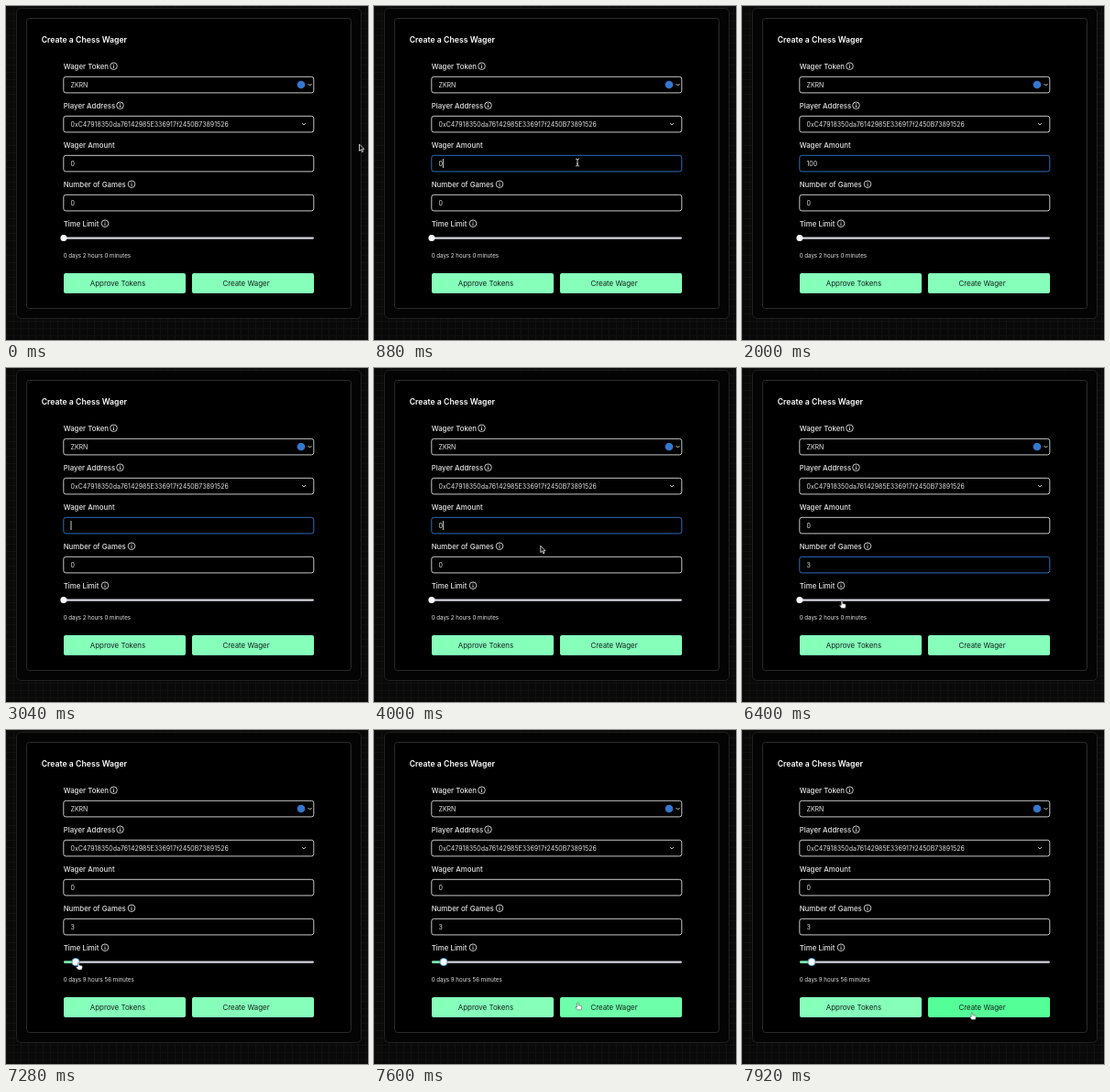
Animation of 395 by 365 pixels, one loop 8 s. Source, as an HTML page:

```html
<!DOCTYPE html>
<html lang="en">
<head>
<meta charset="utf-8">
<title>Wager form</title>
<style>
  html, body { margin: 0; width: 100%; height: 100%; overflow: hidden; background: #090909; }
  svg { display: block; }
  text { font: 7px Inter, "Liberation Sans", sans-serif; fill: #e4e4e4; white-space: pre; }
  .title { font-size: 8.7px; font-weight: 600; fill: #fff; }
  .label { font-size: 7.85px; font-weight: 500; }
  .note { font-size: 6.15px; }
  .button { font-size: 7.9px; fill: #10231a; text-anchor: middle; }
  .line { fill: none; stroke: #dedede; stroke-width: .9; }
</style>
</head>
<body>
<svg id="stage" width="395" height="365" viewBox="0 0 395 365">
  <defs>
    <pattern id="grid" width="8" height="8" patternUnits="userSpaceOnUse">
      <path d="M0 .5H8M.5 0V8" stroke="#111" />
    </pattern>
  </defs>
  <rect width="395" height="365" fill="#090909" />
  <rect width="395" height="365" fill="url(#grid)" />
  <rect x="11.5" y="2.5" width="376" height="339" rx="5" fill="#040404" stroke="#222" />
  <rect x="22.5" y="13.5" width="354" height="317" rx="3" fill="#000" stroke="#2b2b2b" />
  <text class="title" x="38.7" y="40">Create a Chess Wager</text>
  <g id="form"></g>

  <circle cx="322" cy="86" r="4.3" fill="#3478cf" />
  <path class="line" d="M329.5 85l2 2 2-2M323 128l2 2 2-2" />

  <rect x="63" y="252.5" width="273" height="2.2" rx="1.1" fill="#d3d6de" />
  <rect id="filled" x="63" y="252.5" height="2.2" rx="1.1" fill="#6df0a8" />
  <circle id="glow" cy="253.5" r="4.5" fill="#4a9bd0" />
  <circle id="thumb" cy="253.5" r="3.5" fill="#fff" />
  <text id="duration" class="note" x="62.7" y="274.6"></text>

  <rect x="63" y="292" width="133" height="22" rx="2" fill="#86ffbb" />
  <rect id="create" x="203" y="292" width="133" height="22" rx="2" />
  <text class="button" x="122" y="306">Approve Tokens</text>
  <text class="button" x="262" y="306">Create Wager</text>

  <path id="caret" stroke="#fff" stroke-width=".8" />
  <g id="pointer">
    <path id="arrow" d="M0 0V7.4L1.8 5.8 3 8.5 4.2 8 3 5.4H5.3Z" fill="#111" stroke="#eee" stroke-width=".8" />
    <path id="beam" d="M-2-4Q0-4 0-2.8Q0-4 2-4M0-3V3M-2 4Q0 4 0 2.8Q0 4 2 4M-1 1.2H1" fill="none" stroke="#ddd" stroke-width=".9" />
    <path id="hand" d="M-.8.6Q0-.5.8.6V3L3.6 3.6Q4.6 4 4.3 5.4L3.6 8H-.3L-2.6 5.2Q-2.6 4-.8 5Z" fill="#fff" stroke="#333" stroke-width=".5" />
  </g>
</svg>
<script>
const $ = id => document.getElementById(id);
const clamp = v => Math.min(1, Math.max(0, v));
const ease = v => (v = clamp(v)) * v * (3 - 2 * v);
const LOOP = 8000, STEP = 80;

// label, label y, info icon x, initial value
const rows = [
  ["Wager Token", 66, 117.5, "ZKRN"],
  ["Player Address", 109, 124.5, "0xC47918350da76142985E336917f2450B73891526"],
  ["Wager Amount", 152, 0, "0"],
  ["Number of Games", 195, 137, "0"],
  ["Time Limit", 238, 108]
];
$("form").innerHTML = rows.map(([label, y, icon, value], i) => `
  <text class="label" x="62.7" y="${y + 2.8}">${label}</text>
  ${icon ? `<circle class="line" cx="${icon}" cy="${y - .3}" r="3.8" />
    <path class="line" d="M${icon} ${y - 2.5}v1M${icon} ${y - .8}v2.8" />` : ""}
  ${value ? `<rect id="box${i}" class="line" x="62.8" y="${y + 11.3}" width="273" height="17.6" rx="2.5" />
    <text id="value${i}" x="70.5" y="${y + 22.6}">${value}</text>` : ""}`).join("");

const amountTyping = [[0, "0"], [1040, ""], [1280, "1"], [1360, "10"], [1600, "100"],
  [2480, "10"], [2640, "1"], [2800, ""], [3280, "0"]];
const gamesTyping = [[0, "0"], [4800, "3"]];
const caretSpans = [[800, 2000], [2480, 4560], [4800, 5280], [5760, 6240]];
const pointerSpans = [[0, 1040], [3680, 5040], [5920, LOOP]];
const path = [[80, 385.5, 151], [880, 222, 171], [3680, 222, 171], [4320, 141.5, 217.5],
  [5920, 141.5, 217.5], [6400, 109, 254.5], [6640, 58, 255], [6800, 64, 254],
  [7200, 79, 254], [7360, 79, 254], [7680, 249, 306], [7840, 251, 308.5]];

const latest = (list, t) => list.filter(k => k[0] <= t).pop()[1];
const within = (spans, t) => spans.some(([a, b]) => t >= a && t < b);
const show = (id, on) => $(id).setAttribute("visibility", on ? "visible" : "hidden");
const set = (id, attrs) => Object.entries(attrs).forEach(([k, v]) => $(id).setAttribute(k, v));

function pointerAt(t) {
  const next = path.findIndex(k => k[0] > t);
  if (next === 0) return path[0].slice(1);
  if (next < 0) return path[path.length - 1].slice(1);
  const [t0, x0, y0] = path[next - 1], [t1, x1, y1] = path[next];
  const p = ease((t - t0) / (t1 - t0));
  return [x0 + (x1 - x0) * p, y0 + (y1 - y0) * p];
}

function drawPointer(t) {
  const [x, y] = pointerAt(t);
  const inForm = x > 60 && x < 336;
  const shape = inForm && (y > 163 && y < 181 || y > 206 && y < 224) ? "beam"
    : x > 57 && x < 336 && (y > 249 && y < 258 || y > 292) ? "hand" : "arrow";
  const visible = within(pointerSpans, t);
  set("pointer", { transform: `translate(${x} ${y})` });
  for (const id of ["arrow", "beam", "hand"]) show(id, visible && id === shape);
}

function draw(t) {
  $("value2").textContent = latest(amountTyping, t);
  $("value3").textContent = latest(gamesTyping, t);

  const focus = t >= 800 && t < 4240 ? 2 : t >= 4240 && t < 6800 ? 3 : 0;
  for (const i of [2, 3]) $("box" + i).style.stroke = i === focus ? "#3478d4" : "";
  show("caret", focus && within(caretSpans, t));
  if (focus) {
    const x = 71 + $("value" + focus).getComputedTextLength();
    set("caret", { d: `M${x} ${focus === 2 ? 167 : 210}v10` });
  }

  const drag = ease((t - 6800) / 400);
  const minutes = 120 + Math.round(476 * drag);
  const thumbX = 62.9 + 13.1 * drag;
  set("filled", { width: thumbX - 62.9 });
  set("thumb", { cx: thumbX });
  set("glow", { cx: thumbX });
  show("glow", t >= 6800);
  $("duration").textContent = `0 days ${Math.floor(minutes / 60)} hours ${minutes % 60} minutes`;

  const hover = clamp((t - 7520) / 160);
  set("create", { fill: `rgb(${134 - 50 * hover},255,${187 - 35 * hover})` });
  drawPointer(t);
}

function tick() {
  const t = performance.now() % LOOP;
  draw(Math.floor(t / STEP) * STEP);
  requestAnimationFrame(tick);
}
tick();
</script>
</body>
</html>
```
